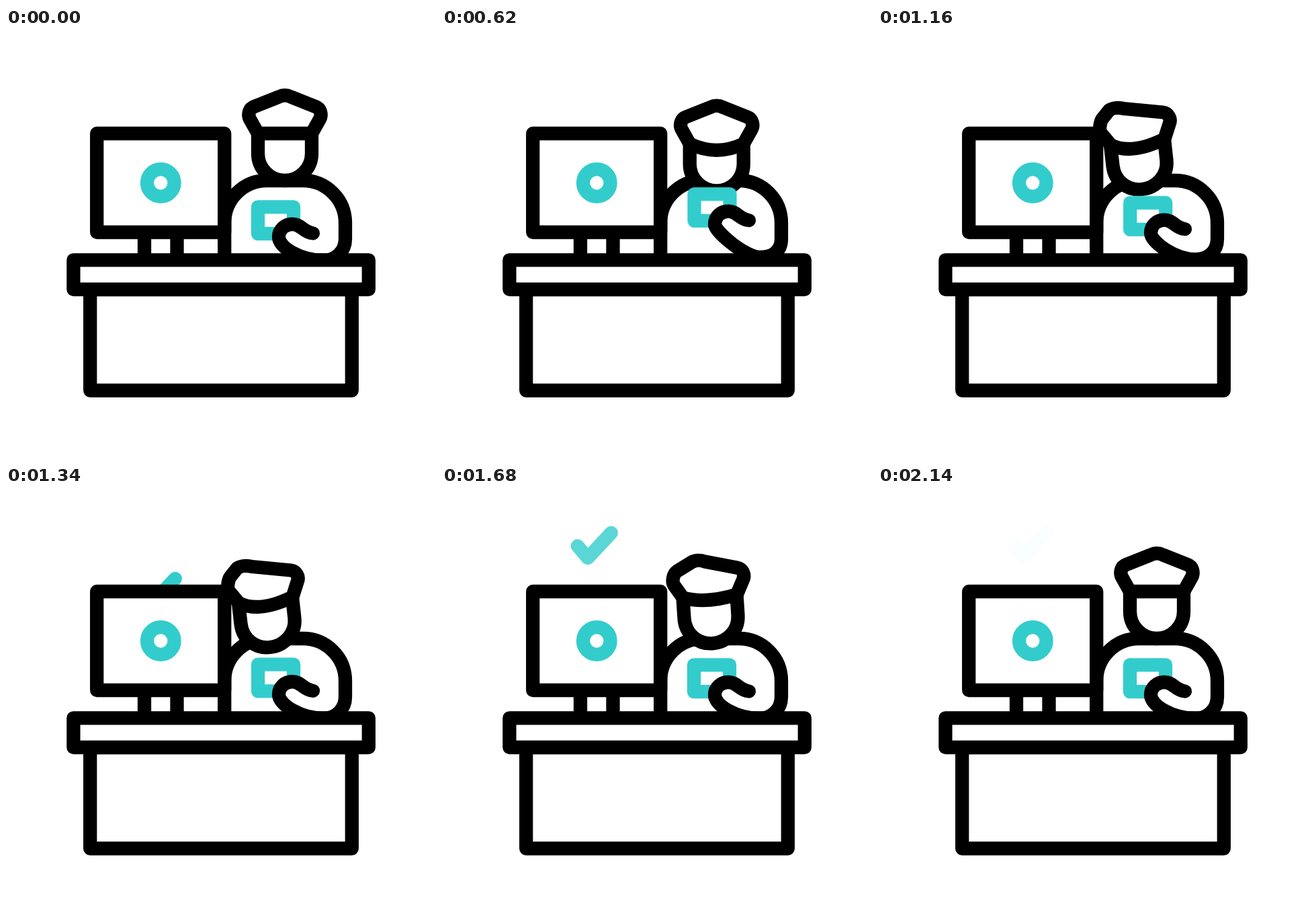
An HTML page without scripts for the animation above (2400 ms loop, 640x640 px).

```html
<!DOCTYPE html>
<html lang="en">
<head>
<meta charset="utf-8">
<title>Front desk guard</title>
<style>
html, body { margin: 0; width: 100%; height: 100%; overflow: hidden; background: #fff; }
svg { display: block; width: 100%; height: 100%; }

.ink { fill: none; stroke: #000; stroke-width: 20.3; stroke-linecap: round; stroke-linejoin: round; }
.solid { fill: #fff; }
.teal { stroke: #33cccc; }

.hat, .face, .arm, .badge, .tick { animation: 2400ms ease-in-out infinite; }
.hat { animation-name: hat; }
.face { animation-name: face; }
.arm { animation-name: arm; }
.badge { animation-name: lift; }
.tick { animation-name: rise, fade; }

/* head: rest, look down, turn to the screen, rest */
@keyframes hat {
  0%, 83.75%, 100% { d: path("M375 157 L363.5 136.5 C359 129 362 119.5 369.5 117 L406 102.5 C412 99.5 418 99.5 424 102.5 L460.5 117 C468 119.5 471 129 466.5 136.5 L455 157 C428 157 402 157 375 157 Z"); }
  30% { d: path("M368.5 173 L357 152.5 C352.5 145 355.5 135.5 363 133 L399.5 118.5 C405.5 115.5 411.5 115.5 417.5 118.5 L454 133 C461.5 135.5 464.5 145 460 152.5 L448.5 173 C422 186 395 186 368.5 173 Z"); }
  48.33%, 58.33% { d: path("M346.5 174 L331 155.5 C329 152 330.5 139.5 334 135 L344 122.5 C349 118.5 359 118 366 120 L424 125.5 C432 126.5 437 135 433.5 143 L426.5 165 C392 182 366 184 346.5 174 Z"); }
}
@keyframes face {
  0%, 83.75%, 100% { d: path("M375 157 L375 187 C375 209 393 227 415 227 C437 227 455 209 455 187 L455 157"); }
  30% { d: path("M368.5 173 L368.5 203 C368.5 225 386.5 243 408.5 243 C430.5 243 448.5 225 448.5 203 L448.5 173"); }
  48.33%, 58.33% { d: path("M346 174 L349.5 205 C352 227 370 242.5 393 240 C415 237.5 431.5 219 429.5 197 L426 165"); }
}

/* hand lifts the card and lowers it */
@keyframes arm {
  0%, 60%, 100% { d: path("M505 290 L505 314 C505 332 491 346 473 346 C437 346 406 326 406 311 C406 300 415 292 426 292 C440 292 442 304 457 305.5"); }
  30% { d: path("M505 290 L505 314 C505 332 493 341 473 341 C452 341 406 302 406 291.5 C406 280 415 272 426 272 C440 272 442 284 457 285.5"); }
}
@keyframes lift {
  0%, 60%, 100% { transform: none; }
  30% { transform: translate(.5px, -20px); }
}

/* tick comes up from behind the screen */
@keyframes rise {
  0%, 46.67% { transform: translateY(95px); }
  72.5%, 100% { transform: none; }
}
@keyframes fade {
  0%, 68.33% { opacity: 1; animation-timing-function: linear; }
  76.9%, 100% { opacity: .012; }
}
</style>
</head>
<body>
<svg viewBox="0 0 640 640">
  <path class="ink teal tick" d="M201.8 87.5 L217 105.3 L251.8 68"/>

  <path class="ink" d="M206 304 V345 M254.5 304 V345"/>
  <rect class="ink solid" x="135.2" y="157" width="190" height="147"/>
  <circle class="ink teal" cx="230.3" cy="230.5" r="20.3"/>

  <path class="ink" d="M325.2 346 V290 A63 63 0 0 1 388 227 H442 A63 63 0 0 1 505 290"/>
  <path class="ink solid face"/>
  <path class="ink solid hat"/>
  <rect class="ink teal badge" x="375" y="266.3" width="53" height="39.9"/>
  <path class="ink solid arm"/>

  <rect class="ink solid" x="125.2" y="389" width="389.6" height="150.5"/>
  <rect class="ink solid" x="100.4" y="345.3" width="439.4" height="43.7"/>
</svg>
</body>
</html>
```
